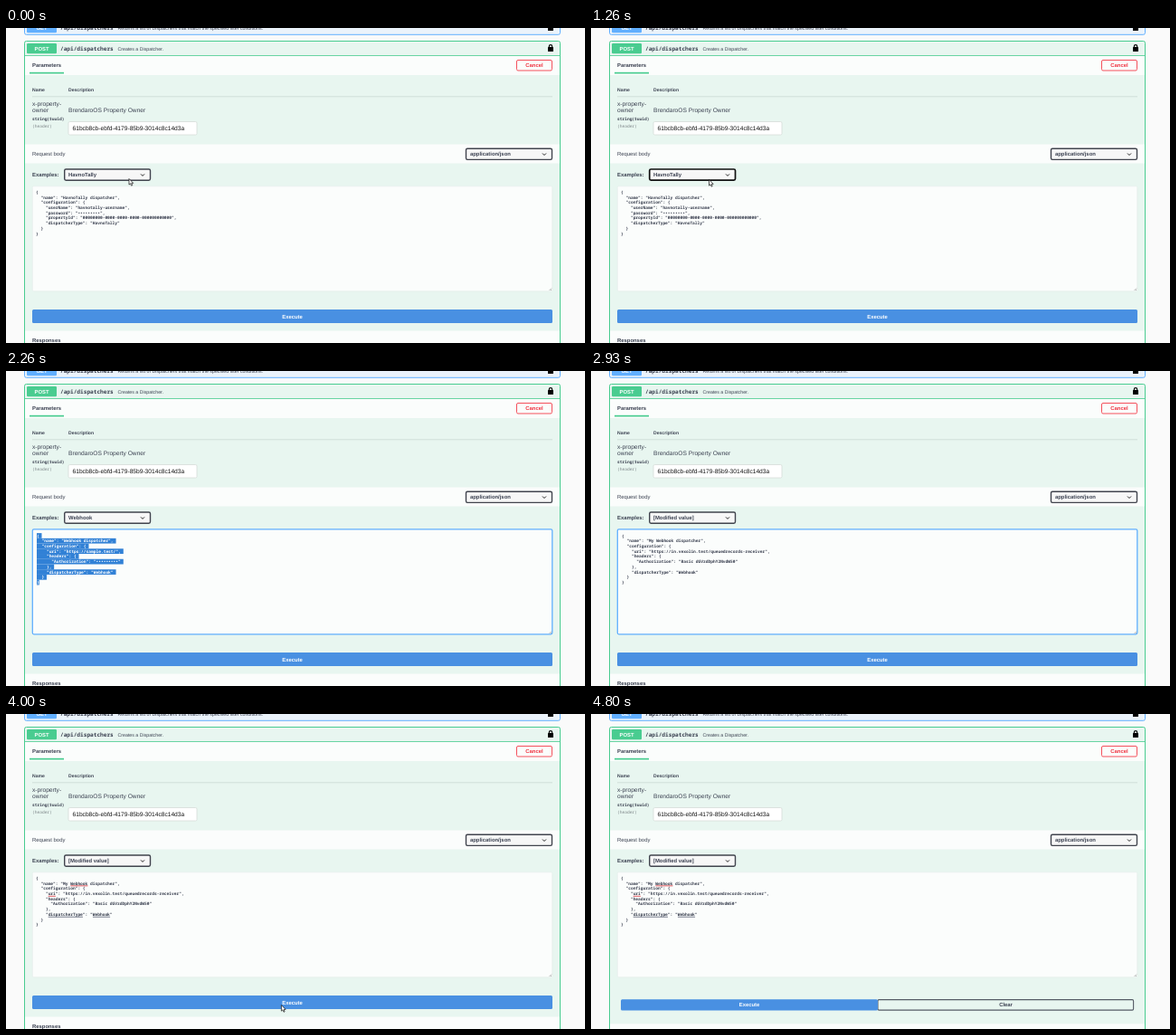
These frames come from a looping animation (640 by 348 pixels, 4.86 s). An HTML page:

```html
<!DOCTYPE html>
<html lang="en">
<head>
<meta charset="utf-8">
<title>API console</title>
<style>
  html, body { margin: 0; width: 100%; height: 100%; overflow: hidden; background: #fafafa; }
  svg { display: block; width: 100%; height: 100%; }
  text { font: 5.9px "Liberation Sans", Arial, sans-serif; fill: #3b4151; white-space: pre; text-rendering: geometricPrecision; }
  .bold { font-weight: 700; }
  .small { font-size: 5.1px; }
  .note { font-size: 5.25px; }
  .large { font-size: 6.65px; }
  .mid { text-anchor: middle; }
  .white { fill: #fff; }
  .mono { font-family: "Noto Sans Mono", "DejaVu Sans Mono", monospace; font-size: 4.56px; }
  .path { font-size: 6.13px; font-weight: 700; }
  .code { font-weight: 600; }
  .band { fill: #fbfdfc; }
  .select { fill: #f7f7f7; stroke: #41444e; stroke-width: 1.4; }
  .focus { stroke: #111; stroke-width: 1.7; }
  .chevron { fill: none; stroke: #222; stroke-width: 1; }
</style>
</head>
<body>
<svg viewBox="0 0 640 348">
  <defs>
    <g id="lock">
      <rect x="599" y="21" width="6" height="5" rx=".6"/>
      <path d="M600.3 21.5v-1.2a1.7 1.7 0 0 1 3.4 0v1.2" fill="none" stroke="#000" stroke-width="1.1"/>
    </g>
    <path id="chevron" class="chevron" d="M-2-1L0 1L2-1"/>
  </defs>

  <g transform="translate(0 -23)">
    <rect x="20.5" y="14" width="592" height="16.3" rx="2" fill="#ebf3fb" stroke="#61affe"/>
    <rect x="23" y="17" width="33" height="11.2" rx="1.3" fill="#61affe"/>
    <text class="bold mid white" x="39.5" y="25">GET</text>
    <text class="mono path" x="60" y="25">/api/dispatchers</text>
    <text class="note" x="123.5" y="24.6">Returns a list of Dispatchers that match the specified filter conditions.</text>
    <use href="#lock"/>
  </g>

  <rect x="20.5" y="14.5" width="592" height="345" rx="2" fill="#e8f6f0"/>
  <rect class="band" x="21" y="31" width="591" height="21"/>
  <rect class="band" x="21" y="128.5" width="591" height="21"/>
  <rect id="responseBand" class="band" x="21" width="591" height="30"/>
  <path d="M20.5 30.5h592" stroke="#49cc90" stroke-width=".8"/>
  <rect x="20.5" y="14.5" width="592" height="345" rx="2" fill="none" stroke="#49cc90"/>
  <rect x="23" y="17" width="33" height="11.2" rx="1.3" fill="#49cc90"/>
  <text class="bold mid white" x="39.5" y="24.8">POST</text>
  <text class="mono path" x="60" y="25">/api/dispatchers</text>
  <text class="note" x="123.5" y="24.6">Creates a Dispatcher.</text>
  <use href="#lock"/>

  <text class="bold" x="29" y="43.4">Parameters</text>
  <rect x="26" y="48.8" width="38" height="1.7" fill="#49cc90"/>
  <rect x="564.5" y="35.5" width="39" height="11.5" rx="1.5" fill="none" stroke="#f4505c"/>
  <text class="bold mid" x="584" y="43.4" style="fill:#f0303f">Cancel</text>

  <text class="bold small" x="29" y="69.8">Name</text>
  <text class="bold small" x="69" y="69.8">Description</text>
  <path d="M29 75.8H604" stroke="#c5d4d0" stroke-width=".7"/>
  <text class="large" x="29" y="86.3">x-property-</text>
  <text class="large" x="29" y="93.3">owner</text>
  <text class="mono bold" x="29" y="102">string($uuid)</text>
  <text class="mono" x="29" y="109.6" font-style="italic" style="fill:#7c8588">(header)</text>
  <text class="large" x="69" y="93">BrendaroOS Property Owner</text>
  <rect x="69" y="103.5" width="142" height="14.5" rx="1.5" fill="#fff" stroke="#d6dcd9" stroke-width=".8"/>
  <text class="large" x="73.5" y="113" style="fill:#111">61bcb8cb-ebfd-4179-85b9-3014c8c14d3a</text>

  <text x="29" y="141.2">Request body</text>
  <rect class="select" x="508.5" y="133.2" width="95" height="12.2" rx="1.6"/>
  <text class="bold" x="513" y="141.2">application/json</text>
  <use href="#chevron" x="595" y="139.5"/>

  <text class="bold" x="29" y="164">Examples:</text>
  <rect id="example" class="select" x="64.7" y="156" width="94.8" height="12.2" rx="1.6"/>
  <text id="choice" class="bold" x="69" y="164"></text>
  <use href="#chevron" x="151" y="162.4"/>

  <rect id="area" x="29.3" y="174.8" width="574.5" height="116" rx="1.5" fill="#fbfdfc"/>
  <path d="M600.5 290L603 287.5M602 290L603 289" stroke="#777" stroke-width=".5"/>
  <g id="code"></g>

  <g id="buttons">
    <rect id="clearBox" fill="#e8f6f0" stroke="#555b66" stroke-width="1.1" rx="1.3"/>
    <text id="clearText" class="bold mid">Clear</text>
  </g>
  <rect id="runBox" fill="#4990e2" rx="1.5"/>
  <text id="runText" class="bold mid white">Execute</text>
  <text id="responses" class="bold" x="29" y="346.8">Responses</text>

  <circle id="ring" cx="303" cy="318.8" r="13.2" fill="none" stroke="#bd3350" stroke-width="1.8"/>
  <path id="cursor" d="M0 0V6.6L1.5 5.3L2.6 7.7L3.7 7.2L2.7 4.9H4.7Z" fill="#fff" stroke="#111" stroke-width=".7"/>
</svg>
<script>
const LOOP = 4860, FPS = 15;
const PICK = 1390, FOCUS = 1590, SELECT = 1660, PASTE = 2330, CLICK = 3600, RUN = 4266;
const CHAR = 2.736, PITCH = 5.73;
const scheme = 'https:\/\/';

const webhook = (name, uri, Authorization) => ({
  name,
  configuration: { uri: scheme + uri, headers: { Authorization }, dispatcherType: 'Webhook' }
});
const dots = '•'.repeat(9);
const bodies = [
  {
    name: 'HavnoTally dispatcher',
    configuration: {
      userName: 'havnotally-username', password: dots,
      propertyId: '00000000-0000-0000-0000-000000000000', dispatcherType: 'HavnoTally'
    }
  },
  webhook('Webhook dispatcher', 'sample.test/', dots),
  webhook('My Webhook dispatcher', 'in.vexolin.test/queuedrecords-receiver', 'Basic dGVzdDphY2NvdW50')
].map(body => JSON.stringify(body, null, 2).split('\n'));
const choices = ['HavnoTally', 'Webhook', '[Modified value]'];

// Spelling marks: line, word, colour
const marks = [[1, 'Webhook', '#d8323c'], [3, 'uri', '#d8323c'], [7, 'dispatcherType', '#555b70'], [7, 'Webhook', '#555b70']];

// Cursor path: time, x, y
const moves = [
  [[0, 136, 166.5], [300, 136, 166.5], [900, 130.5, 167.5], [1300, 130.5, 167.5], [1580, 150, 212], [SELECT, 150, 212]],
  [[3250, 200, 225], [3540, 302, 318], [3950, 302, 318], [4200, 325, 352]]
];

const $ = id => document.getElementById(id);
const ease = p => p * p * (3 - 2 * p);
const mix = (a, b, p) => a + (b - a) * p;
const show = (id, on) => $(id).setAttribute('visibility', on ? 'visible' : 'hidden');
const set = (id, attrs) => Object.entries(attrs).forEach(([k, v]) => $(id).setAttribute(k, v));

function codeMarkup(lines, focused, selected, checked) {
  const left = focused ? 34 : 33, base = focused ? 183.5 : 182.8;
  let out = '';
  lines.forEach((line, i) => {
    const y = base + i * PITCH;
    if (selected) {
      const chars = line.length + (i < lines.length - 1);
      out += `<rect x="${left}" y="${y - 4.4}" width="${chars * CHAR}" height="${PITCH}" fill="#3181d6"/>`;
    }
    out += `<text class="mono code${selected ? ' white' : ''}" x="${left}" y="${y}">${line}</text>`;
  });
  if (checked) for (const [row, word, color] of marks) {
    const x = left + lines[row].indexOf(word) * CHAR;
    out += `<path d="M${x} ${base + row * PITCH + 1.3}h${word.length * CHAR}" stroke="${color}" stroke-width=".8"/>`;
  }
  return out;
}

function drawEditor(t) {
  const state = t < PICK ? 0 : t < PASTE ? 1 : 2;
  const focused = t >= FOCUS && t < CLICK;
  const selected = t >= SELECT && t < PASTE;
  const key = [state, focused, selected].join();
  if (key === drawEditor.key) return;
  drawEditor.key = key;
  $('choice').textContent = choices[state];
  $('code').innerHTML = codeMarkup(bodies[state], focused, selected, t >= CLICK);
  set('area', { stroke: focused ? '#61affe' : '#e1e8e5', 'stroke-width': focused ? 1.3 : .5 });
}

function drawButtons(t) {
  const done = t >= RUN;
  const p = ease(Math.min(1, Math.max(0, (t - RUN) / 300)));
  const left = done ? 33 : 29, right = done ? mix(101, 317, p) : 604;
  const top = done ? mix(315.7, 315.2, p) : 311, height = done ? mix(13.3, 12.3, p) : 15;
  const y = top + height / 2 + (done ? 2.1 : 2.4);
  set('runBox', { x: left, y: top, width: right - left, height });
  set('runText', { x: (left + right) / 2, y });
  set('clearBox', { x: right, y: top + .4, width: 599.6 - right, height: height - .8 });
  set('clearText', { x: (right + 600) / 2, y });
  set('responseBand', { y: done ? 342.3 : 334.5 });
  show('buttons', done);
  show('responses', !done);
}

function drawCursor(t) {
  const path = moves.find(m => t >= m[0][0] && t < m[m.length - 1][0]);
  show('cursor', path);
  show('ring', t >= CLICK && t < 3870);
  if (!path) return;
  const i = path.findIndex(m => m[0] > t);
  const [t0, x0, y0] = path[i - 1], [t1, x1, y1] = path[i];
  const p = ease((t - t0) / (t1 - t0));
  set('cursor', { transform: `translate(${mix(x0, x1, p)} ${mix(y0, y1, p)})` });
}

function frame() {
  const now = performance.now() % LOOP;
  const t = Math.floor((now + 6.7) * FPS / 1000) * 1000 / FPS;
  drawEditor(t);
  drawButtons(t);
  drawCursor(t);
  $('example').classList.toggle('focus', t >= 1130 && t < FOCUS);
  requestAnimationFrame(frame);
}
frame();
</script>
</body>
</html>
```
